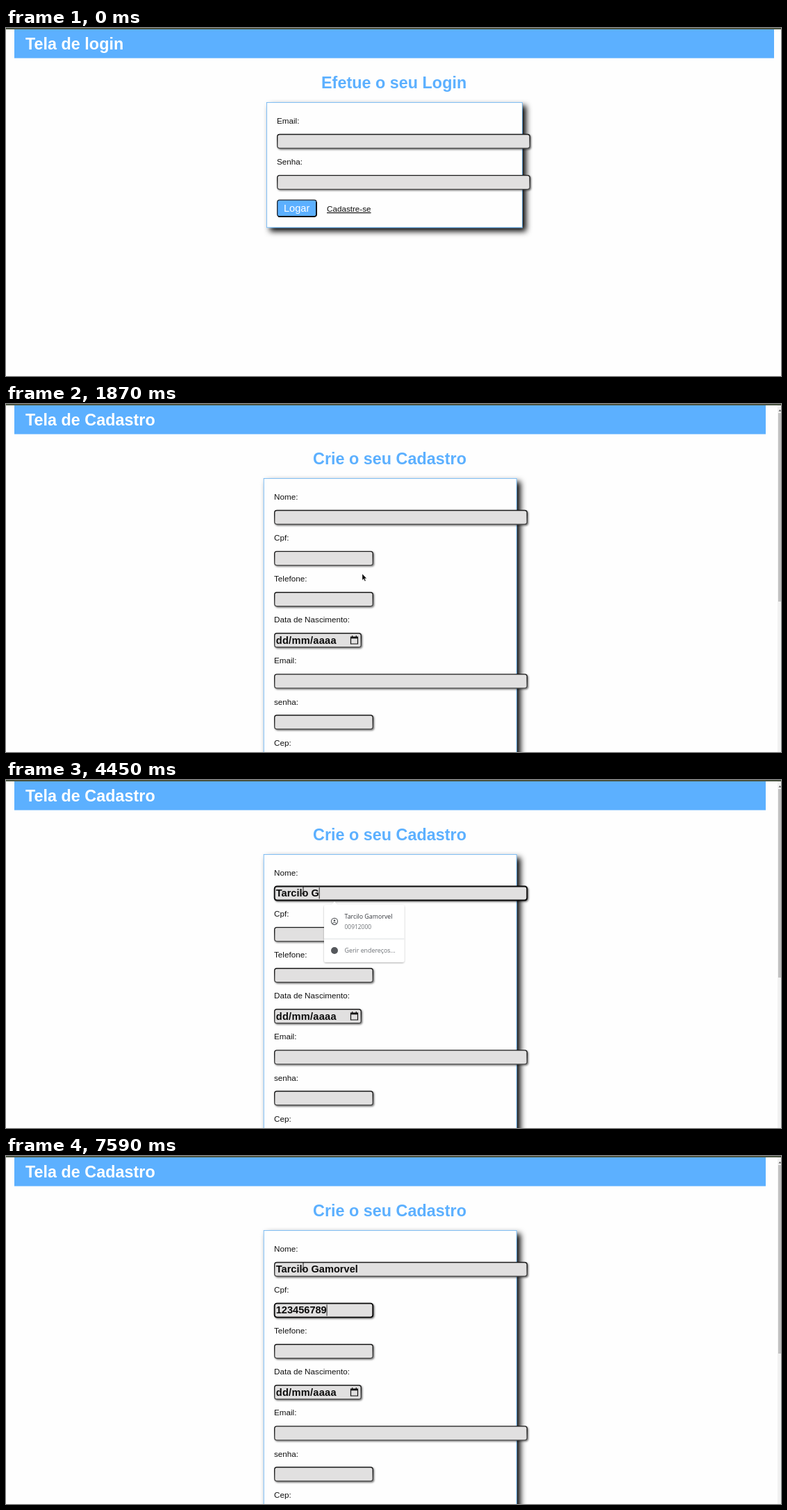
An HTML page that plays this animation: 1116 px wide and 502 px high, repeating every 8 s.

```html
<!DOCTYPE html>
<html lang="pt-BR">
<head>
<meta charset="utf-8">
<title>Cadastro</title>
<style>
html, body { margin: 0; width: 100%; height: 100%; overflow: hidden; background: #fefefe; }
svg { display: block; width: 1116px; height: 502px; }
text { font: 11.68px "Liberation Sans", Arial, sans-serif; fill: #111; white-space: pre; }
.title { font-size: 23.4px; font-weight: bold; fill: #fff; }
.head { font-size: 23.4px; font-weight: bold; fill: #5cb0ff; }
.value { font-size: 14.6px; font-weight: bold; fill: #0c0c0c; }
.button { font-size: 14.6px; fill: #fff; }
.link { text-decoration: underline; }
.item { font: 8.85px "Open Sans", "Noto Sans", sans-serif; fill: #33363c; }
.note { font: 8.45px "Open Sans", "Noto Sans", sans-serif; fill: #6c7075; }
</style>
</head>
<body>
<svg id="stage" viewBox="0 0 1116 502" xmlns="http://www.w3.org/2000/svg"></svg>
<script>
const LOOP = 8000;
const PITCH = 59.1;
const ROW = 42.6;
const NAME = "Tarcilo Gamorvel";
const CPF = "123456789";

const text = (x, y, s, cls = "") => `<text x="${x}" y="${y}" class="${cls}">${s}</text>`;

const header = (right, title, headX, head) =>
  `<rect x="12" y="2" width="${right - 12}" height="41.5" fill="#5cb0ff"/>` +
  text(28, 31, title, "title") + text(headX, 87, head, "head");

const card = (x, w, h) =>
  `<rect x="${x}" y="107.4" width="${w}" height="${h}" fill="#fefefe" stroke="#6fb4f0" stroke-width=".9" filter="url(#deep)"/>`;

const input = (x, row, w, id = "") =>
  `<rect id="${id}" x="${x + .7}" y="${153.5 + PITCH * row}" width="${w - 1.4}" height="20" rx="3.4"
    fill="#e1e0e0" stroke="url(#edge)" stroke-width="1.4" filter="url(#soft)"/>`;

const field = (x, row, label, w, id) =>
  text(x, 138 + PITCH * row, label) + (w ? input(x, row, w, id) : "");

const panel = (x, y, w, h, tip) =>
  `<g filter="url(#lift)"><rect x="${x}" y="${y}" width="${w}" height="${h}" rx="3" fill="#fff"/>
    <path d="M${tip - 5} ${y + .5}l5 -5l5 5z" fill="#fff"/></g>`;

const person = y =>
  `<g fill="none" stroke="#55585c" stroke-width="1.1"><circle cx="473" cy="${y}" r="4.6"/>
    <circle cx="473" cy="${y - 1.2}" r="1.4" fill="#55585c" stroke="none"/>
    <path d="M470 ${y + 3}q3 -3 6 0"/></g>`;

// Autofill list: one entry per [name, detail] pair, then the manage line.
function suggestions(id, w, entries) {
  const shift = ROW * (entries.length - 1);
  const rows = entries.map(([name, note], i) => {
    const y = ROW * i;
    return person(204 + y) + text(487.5, 200 + y, name, "item") + text(487.5, 215 + y, note, "note");
  });
  return `<g id="${id}">${panel(458, 180, w, 83 + shift, 473)}${rows.join("")}
    <path d="M458 ${229.2 + shift}h${w}" stroke="#dcdee0"/>
    <circle cx="473" cy="${246 + shift}" r="5" fill="#55585c"/>
    <text x="487.5" y="${249.3 + shift}" class="item" style="fill:#6c7075">Gerir endereços...</text></g>`;
}

const stage = document.getElementById("stage");
stage.innerHTML = `
<defs>
  <filter id="deep" x="-20%" y="-20%" width="140%" height="140%"><feDropShadow dx="5" dy="5" stdDeviation="4.3" flood-color="#000"/></filter>
  <filter id="soft" x="-5%" y="-30%" width="110%" height="170%"><feDropShadow dx="1.3" dy="1.3" stdDeviation="1" flood-color="#000" flood-opacity=".55"/></filter>
  <filter id="lift" x="-10%" y="-10%" width="120%" height="125%"><feDropShadow dx="0" dy="1" stdDeviation="1.3" flood-color="#000" flood-opacity=".32"/></filter>
  <linearGradient id="edge" x2="0" y2="1"><stop offset=".3" stop-color="#1c1c1c"/><stop offset="1" stop-color="#4c4c4c"/></linearGradient>
</defs>
<rect width="1116" height="502" fill="#fefefe"/>
<g id="login">
  ${header(1106, "Tela de login", 454, "Efetue o seu Login")}
  ${card(375.4, 368, 180.4)}
  ${field(390, 0, "Email:", 365)}
  ${field(390, 1, "Senha:", 365)}
  <rect x="390.7" y="248.2" width="56.4" height="23.8" rx="3.4" fill="#5cb0ff" stroke="#1b222b" stroke-width="1.3"/>
  <path d="M392 272h52q3 0 3 -3v-18" fill="none" stroke="#000" stroke-width="1.5"/>
  ${text(400, 265, "Logar", "button")}
  ${text(462, 265, "Cadastre-se", "link")}
</g>
<g id="signup">
  ${header(1094, "Tela de Cadastro", 442, "Crie o seu Cadastro")}
  ${card(371.2, 364, 480)}
  ${field(386, 0, "Nome:", 365, "nameBox")}
  ${field(386, 1, "Cpf:", 143, "cpfBox")}
  ${field(386, 2, "Telefone:", 143)}
  ${field(386, 3, "Data de Nascimento:", 126)}
  ${field(386, 4, "Email:", 365)}
  ${field(386, 5, "senha:", 143)}
  ${field(386, 6, "Cep:")}
  <text x="388.7" y="346" class="value" style="letter-spacing:.28px">dd/mm/aaaa</text>
  <path d="M496.5 336.2h10v9.8h-10z M498.7 334v2 M504.3 334v2" fill="none" stroke="#111" stroke-width="1.2"/>
  <path d="M496 337.2h11" stroke="#111" stroke-width="2.2"/>
  <text id="name" x="388.7" y="168" class="value"></text>
  <text id="cpf" x="388.7" y="227.3" class="value"></text>
  <path id="caret" stroke="#111" stroke-width=".9"/>
  ${suggestions("three", 186, [
    [NAME, "São Paulo, (00) 90000-0000"],
    ["Tarcilo Ambrelino Gamorvel de...", "SP, Tarcilogamorvel42@email.test"],
    [NAME, "00912-000"]])}
  ${suggestions("one", 115.5, [[NAME, "00912000"]])}
  <g id="cpfList">${panel(442, 239, 114.5, 33, 457)}${text(450.7, 258.5, "1233456789", "item")}</g>
  <rect x="1111" y="2" width="5" height="500" fill="#f1f1f1"/>
  <rect x="1112" y="13" width="4" height="272" fill="#c1c1c1"/>
  <path d="M1112.5 10.5l2 -2.4l2 2.4z" fill="#555"/>
</g>
<rect width="1116" height="2" fill="#4b5442"/>
<path id="arrow" d="M0 0V9.2L2.1 7.3L3.6 10.6L5.1 9.9L3.6 6.7H6.4Z" fill="#000" stroke="#fff" stroke-width=".4"/>
<path id="beam" d="M425.6 153.4q2.4 0 2.4 1.3q0 -1.3 2.4 -1.3M428 154.5v8.4M425.6 164q2.4 0 2.4 -1.3q0 1.3 2.4 1.3" fill="none" stroke="#222" stroke-width="1"/>`;

const el = id => document.getElementById(id);
const show = (id, on) => { el(id).style.display = on ? "" : "none"; };
const between = (t, a, b) => t >= a && t < b;

// Latest entry whose start time has been reached.
const at = (steps, t) => steps.reduce((cur, s) => (t >= s[0] ? s : cur), null);

const pointer = [
  [140, 1076, 434], [280, 935, 335], [420, 765, 195], [560, 605, 95],
  [700, 500, 66], [850, 428, 110], [990, 415, 168], [1130, 452, 205],
  [1270, 473, 240], [1420, 483, 260], [1870, 513, 245], [1990, 467, 195]];

const nameKeys = [3160, 3300, 3450, 3730, 3870, 4020, 4160, 4160,
  4450, 4600, 4740, 4890, 5040, 5180, 5330, 5330];
const cpfKeys = [6300, 6450, 6590, 6710, 6990, 7140, 7290, 7440, 7590];
const typed = (s, keys, t) => s.slice(0, keys.filter(k => k <= t).length);

function focus(id, on) {
  el(id).setAttribute("stroke", on ? "#0a0a0a" : "url(#edge)");
  el(id).setAttribute("stroke-width", on ? 1.9 : 1.4);
}

function render(t) {
  const onName = between(t, 2290, 5440);
  const onCpf = t >= 5440;
  show("login", t < 1870);
  show("signup", t >= 1870);
  show("three", between(t, 2580, 4450));
  show("one", between(t, 4450, 5440));
  show("cpfList", between(t, 6300, 6710));
  focus("nameBox", onName);
  focus("cpfBox", onCpf);

  el("name").textContent = typed(NAME, nameKeys, t);
  el("cpf").textContent = typed(CPF, cpfKeys, t);
  show("caret", between(t, 2440, 3020) || between(t, 3160, 6010) || t >= 6300);
  if (t >= 2440) {
    const x = 389 + el(onCpf ? "cpf" : "name").getComputedTextLength();
    el("caret").setAttribute("d", `M${x} ${onCpf ? 214.3 : 155}v16.4`);
  }

  const pos = at(pointer, t);
  show("arrow", pos && t < 2130);
  show("beam", t >= 2130);
  if (pos) el("arrow").setAttribute("transform", `translate(${pos[1]} ${pos[2]})`);
}

function tick() {
  render(performance.now() % LOOP);
  requestAnimationFrame(tick);
}
tick();
</script>
</body>
</html>
```
